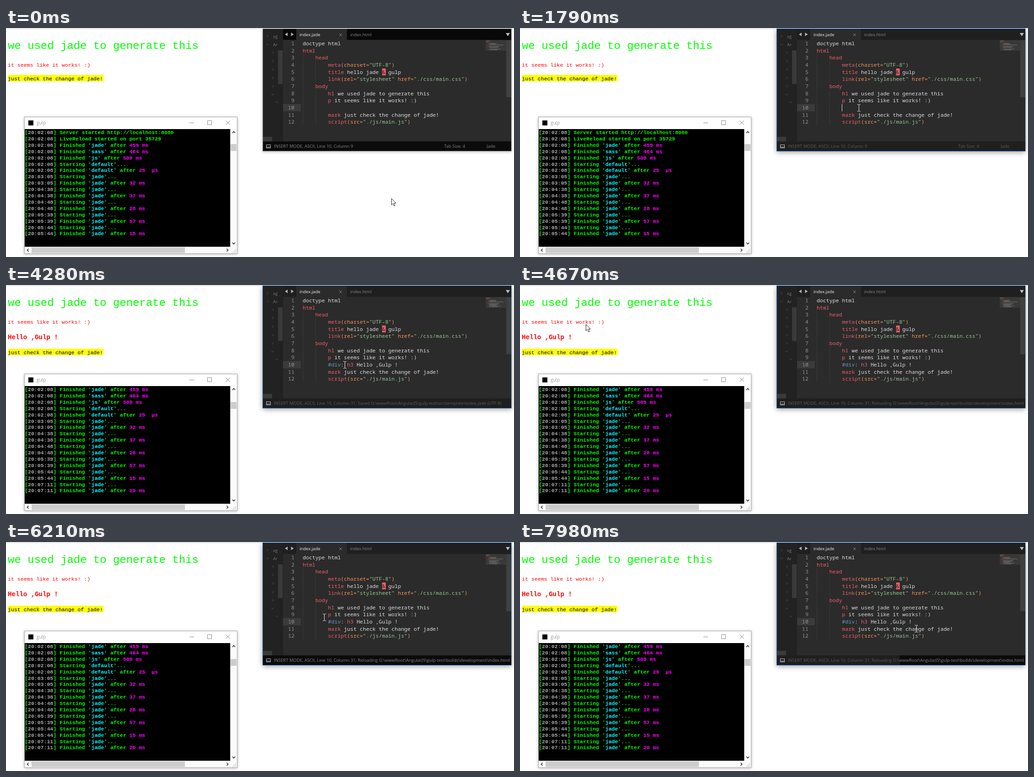
An HTML page that plays this animation: 1113 by 503 pixels, repeating every 8 s.

```html
<!DOCTYPE html>
<html lang="en">
<head>
<meta charset="utf-8">
<title>Live reload</title>
<style>
  html, body { margin: 0; width: 100%; height: 100%; overflow: hidden; background: #fff; }
  svg { position: absolute; left: 0; top: 0; }
  .win { position: absolute; }
  #conWin { left: 40px; top: 195px; width: 467px; height: 301px; box-shadow: 0 1px 6px rgba(0,0,0,.3); }
  #edWin { left: 562px; top: 1px; width: 545px; height: 269px; box-shadow: 0 2px 6px rgba(0,0,0,.3); }
  #edWin.on { box-shadow: 0 3px 11px rgba(0,0,0,.4); }
  text { white-space: pre; }
  .page { font-family: "Liberation Mono", monospace; font-size: 11.58px; }
  .code { font-family: "Noto Sans Mono", monospace; font-size: 11.58px; fill: #dcdcdc; }
  .con { font-family: "Liberation Mono", monospace; font-size: 11.58px; font-weight: bold; fill: #0f0; }
  .ui { font-family: "Open Sans", sans-serif; font-size: 9.5px; }
  .num { fill: #929292; text-anchor: end; }
  .r { fill: #ec5f67; } .o { fill: #f99157; } .g { fill: #99c794; } .b { fill: #6699cc; } .k { fill: #2b2b2b; }
  .t { fill: #a8a8a8; } .c { fill: #0ff; } .m { fill: #f0f; }
  .line { fill: none; stroke-width: 1; }
  .bold .line { stroke-width: 1.7; }
</style>
</head>
<body>
<div class="win" id="conWin"></div>
<div class="win" id="edWin"></div>
<svg id="stage" width="1113" height="503" viewBox="0 0 1113 503"></svg>
<script>
const LOOP = 8000, PITCH = 6.95, ROW = 15.64, CON_ROW = 13.9;
const esc = s => s.replace(/&/g, '&amp;').replace(/</g, '&lt;');
const rect = (x, y, w, h, fill, more = '') =>
  `<rect x="${x}" y="${y}" width="${w}" height="${h}" fill="${fill}" ${more}/>`;
const path = (d, color, more = '') => `<path class="line" d="${d}" stroke="${color}" ${more}/>`;
const text = (x, y, cls, str, more = '') => `<text x="${x}" y="${y}" class="${cls}" ${more}>${esc(str)}</text>`;
// Segments are split by "|"; the first letter of each is its colour class.
const rich = (x, y, cls, str, more = '') => `<text x="${x}" y="${y}" class="${cls}" ${more}>` +
  str.split('|').map(s => `<tspan class="${s[0]}">${esc(s.slice(1))}</tspan>`).join('') + '</text>';
const chevron = (x, y, dir, color, s = 2.5) => {
  const d = { r: [-s / 2, -s, s / 2, 0, -s / 2, s], l: [s / 2, -s, -s / 2, 0, s / 2, s],
              d: [-s, -s / 2, 0, s / 2, s, -s / 2], u: [-s, s / 2, 0, -s / 2, s, s / 2] }[dir];
  return path(`M${x + d[0]} ${y + d[1]}L${x + d[2]} ${y + d[3]}L${x + d[4]} ${y + d[5]}`, color);
};
const cross = (x, y, s, color) => path(`M${x - s} ${y - s}l${2 * s} ${2 * s}m0 ${-2 * s}l${-2 * s} ${2 * s}`, color);

function page() {
  return rect(0, 1, 1113, 1, '#c8c8c8') +
    text(4, 46, 'page', 'we used jade to generate this', 'fill="#0f0" style="font-size:24.03px"') +
    text(4, 84.5, 'page', 'it seems like it works! :)', 'fill="#f00"') +
    text(4, 118.5, 'page', 'Hello ,Gulp !', 'id="hello" fill="#f00" style="font-size:14.08px;font-weight:bold"') +
    '<g id="mark">' + rect(4.5, 103, 209, 14, '#ff0') +
    text(4, 114.5, 'page', 'just check the change of jade!') + '</g>';
}

const log = [['02:08', 'Server started http://localhost:8080'], ['02:08', 'LiveReload started on port 35729'],
  ['02:08', 'jade', '459 ms'], ['02:08', 'sass', '464 ms'], ['02:08', 'js', '509 ms'],
  ['02:08', 'default', ''], ['02:08', 'default', '25  μs']];
[['03:05', 32], ['04:38', 37], ['04:48', 28], ['05:39', 57], ['05:44', 15], ['07:11', 20]]
  .forEach(([at, ms]) => log.push([at, 'jade', ''], [at, 'jade', ms + ' ms']));

function logLine([at, what, took], i) {
  const body = took === undefined ? what
    : took ? `Finished '|c${what}|n' after |m${took}` : `Starting '|c${what}|n'...`;
  return rich(41, 0, 'con', `n[|t20:${at}|n] ${body}`, `id="log${i}"`);
}

function consoleWindow() {
  let grip = '';
  for (let i = 0; i < 3; i++)
    for (let j = 0; j <= i; j++) grip += rect(502 - 3 * j, 486 + 3 * i, 1.5, 1.5, '#b0b0b0');
  return rect(40.5, 195.5, 466, 300, '#fff', 'stroke="#a8a8a8"') +
    rect(49, 203, 11, 11, '#000') + text(67, 212, 'ui', 'gulp', 'fill="#999" style="font-size:10px"') +
    path('M402 208.5h10M441.5 203.5h9v9h-9z', '#888') + cross(486, 208, 4.5, '#888') +
    rect(41, 222, 450.5, 258.5, '#000') + rect(491.5, 222, 14.5, 259, '#fafafa') +
    rect(41, 481, 465, 14, '#fafafa') + rect(56, 482, 336, 12, '#cdcdcd') +
    rect(492, 255, 13, 15, '#cdcdcd', 'id="thumb"') +
    '<g class="bold">' + chevron(499, 229, 'u', '#333', 3) + chevron(499, 473, 'd', '#333', 3) +
    chevron(48, 488, 'l', '#333', 3) + chevron(485, 488, 'r', '#333', 3) + '</g>' + grip +
    log.map(logLine).join('');
}

const code = [[0, 'ndoctype html'], [0, 'rhtml'], [4, 'rhead'],
  [8, 'rmeta|o(charset=|g"UTF-8"|o)'], [8, 'rtitle|n hello jade |k&|n gulp'],
  [8, 'rlink|o(rel=|g"stylesheet"|o href=|g"./css/main.css"|o)'], [4, 'rbody'],
  [8, 'rh1|n we used jade to generate this'], [8, 'rp|n it seems like it works! :)'],
  [8, 'b#div|n: |rh3|n Hello ,Gulp !'], [8, 'rmark|n just check the change of jade!'],
  [8, 'rscript|o(src=|g"./js/main.js"|o)']];
const col = n => 650 + n * PITCH;
const base = i => 38.2 + i * ROW;

function miniLine([indent, str], i) {
  let x = 1052 + indent * .75;
  const bars = str.split('|').map(seg => {
    const w = (seg.length - 1) * .72;
    x += w;
    return `<rect class="${seg[0]}" x="${x - w}" y="${28 + i * 1.75}" width="${w}" height="1" opacity=".5"/>`;
  }).join('');
  return `<g fill="#aaa" ${i === 9 ? 'id="miniNew"' : ''}>${bars}</g>`;
}

function sidebar() {
  const c = '#555';
  return rect(563, 2, 44, 248, '#222') + chevron(573, 18, 'r', c) + chevron(573, 36, 'd', c) +
    text(585, 22, 'ui', 'xg', 'fill="#777"') + text(585, 40, 'ui', 'Ar', 'fill="#777"') +
    [54, 72, 91, 110, 128].map(y => chevron(585, y, 'r', c)).join('') +
    chevron(584, 146, 'd', c) + chevron(593, 163, 'd', c) +
    rect(596, 49, 10, 74, '#3a3a3a') + rect(563, 239, 20, 10, '#3a3a3a');
}

const statusBar = (id, bg, ink) => `<g id="${id}">` + rect(563, 249, 544, 21, bg) +
  path('M570.5 256.5h9v7h-9zM570 261.5h10', '#c8c8c8') +
  `<g clip-path="url(#statusClip)">` + text(587, 263, 'ui msg', '', `fill="${ink}"`) + '</g>' +
  `<g class="labels">` + text(960, 263, 'ui', 'Tab Size: 4', `fill="${ink}"`) +
  text(1053, 263, 'ui', 'Jade', `fill="${ink}"`) + '</g></g>';

function editor() {
  const guides = [[0, 2, 12], [4, 3, 6], [4, 7, 12]].map(([c, a, b]) =>
    path(`M${Math.round(col(c)) + .5} ${26 + a * ROW}V${26 + b * ROW}`, '#4a4a4a', 'stroke-dasharray="1 1"')).join('');
  const lines = code.map(([indent, s], i) =>
    text(632, base(i), 'code num', String(i + 1)) +
    rich(col(indent), base(i), 'code', s, i === 9 ? 'id="added"' : '')).join('');
  return rect(562.5, 1.5, 544.5, 269, '#1c1c1c', 'id="frame"') + sidebar() +
    rect(607, 2, 500, 25, '#080808', 'id="tabs"') + rect(636, 2, 111, 25, '#2b2b2b') +
    rect(607, 26, 500, 223, '#2b2b2b') +
    '<path d="M617 10v8l-6-4zM624.5 10v8l6-4z" fill="#b0b0b0"/><path d="M1095 11h9l-4.5 7z" fill="#c0c0c0"/>' +
    text(643, 18, 'ui', 'index.jade', 'fill="#f0f0f0"') + text(754, 18, 'ui', 'index.html', 'fill="#858585"') +
    `<g id="clean">${cross(733, 15, 3, '#888')}</g>` +
    '<circle id="dirty" class="line" cx="733" cy="15" r="3" stroke="#e8c35c"/>' +
    rect(607, 167, 39, 16, '#3b3b3b') + guides + rect(824, 89, 8, 15, '#ec5f67') + lines +
    rect(0, 167, 1, 16, '#e8e8e8', 'id="caret"') +
    rect(1051, 27, 45, 23, '#383838') + code.map(miniLine).join('') + rect(1096, 27, 11, 125, '#404040') +
    statusBar('lit', '#0b0b0b', '#858585') +
    `<g clip-path="url(#dimClip)">${statusBar('dim', '#1f1f1f', '#5c5c5c')}</g>`;
}

const pointer = '<g id="cursor">' +
  '<path id="arrow" d="M0 0V14L3.3 11L5.7 16.5L8 15.5L5.6 10.2H10Z" fill="#fff" stroke="#222"/>' +
  '<g id="beam"><path class="line" d="M-3.5 -7.5H-1L0 -6.5L1 -7.5H3.5M0 -6.5V6.5M-3.5 7.5H-1L0 6.5L1 7.5H3.5" stroke="#eee"/></g>' +
  '<g id="busy"><circle class="line" cx="12" cy="0" r="4.5" stroke="#2d86c9" style="stroke-width:3.2"/>' +
  '<path id="spin" class="line" d="M12 -4.5A4.5 4.5 0 0 1 16.5 0" stroke="#7cc4ee" style="stroke-width:2"/></g></g>';

const $ = id => document.getElementById(id);
$('stage').innerHTML = '<defs><clipPath id="statusClip"><rect x="563" y="249" width="541" height="21"/></clipPath>' +
  '<clipPath id="dimClip"><rect id="dimBox" x="563" y="249" width="544" height="21"/></clipPath></defs>' +
  page() + consoleWindow() + editor() + pointer;

const mode = 'INSERT MODE, ASCII, Line 10, Column ';
const root = '31; %G:\\wwwRoot\\AngularJS\\gulp-test\\';
const messages = [[0, mode + '9'], [2340, mode + '31'],
  [3770, mode + root.replace('%', 'Saved ') + 'src\\template\\index.jade (UTF-8)'],
  [4400, mode + root.replace('%', 'Reloading ') + 'builds\\development\\index.html']];
const dimWidth = [[0, 0], [1300, 544], [4700, 0], [7650, 269]];
const logShift = [[0, 0], [3890, 1], [3990, 2]];
// time, x, y of the hot spot
const route = [[0, 844, 374], [370, 844, 374], [600, 857, 330], [850, 845, 230], [1060, 822, 176],
  [1150, 784, 171], [1240, 742, 175], [4290, 742, 175], [4500, 400, 120], [4720, 70, 76],
  [5000, 30, 88], [5120, 30, 88], [5220, 60, 100], [5400, 500, 160], [5600, 985, 218],
  [5880, 873, 181], [6180, 873, 181], [6210, 700, 165], [6360, 300, 120], [6510, 60, 95],
  [6700, 5, 80], [6990, 52, 110], [7200, 200, 250], [7400, 450, 380], [7600, 750, 330],
  [7800, 859, 236], [7980, 868, 190], [8000, 868, 190]];
// caret opacity over time
const blink = [[0, 0], [1270, 0], [1300, 1], [1790, 1], [1970, 0], [2339, 0], [2340, 1], [2710, 1], [2890, 0],
  [3380, 0], [3530, 1], [3940, 1], [4090, 0], [5700, 0], [5710, 1], [5910, 1], [6060, 0],
  [7770, 0], [7780, 1], [7830, 1], [7980, 0], [8000, 0]];

const step = (table, t) => table.filter(k => k[0] <= t).pop()[1];
function tween(table, t) {
  const i = Math.max(1, table.findIndex(k => k[0] > t));
  const a = table[i - 1], b = table[i], f = (t - a[0]) / (b[0] - a[0]);
  return a.slice(1).map((v, n) => v + (b[n + 1] - v) * f);
}
const show = (id, on) => $(id).setAttribute('visibility', on ? 'visible' : 'hidden');

function draw(t) {
  const focus = t >= 1300, pasted = t >= 2340, saved = t >= 3770, reloaded = t >= 4280;
  show('hello', reloaded);
  $('mark').setAttribute('transform', `translate(0 ${reloaded ? 37 : 0})`);

  const shift = step(logShift, t);
  log.forEach((_, i) => {
    const row = i - shift;
    show('log' + i, row >= 0 && row < 17);
    $('log' + i).setAttribute('y', 233 + row * CON_ROW);
  });
  $('thumb').setAttribute('y', 255 + shift);

  $('edWin').className = focus ? 'win on' : 'win';
  $('frame').setAttribute('stroke', focus ? '#1e63b4' : '#9a9a9a');
  $('tabs').setAttribute('fill', focus ? '#1f1f1f' : '#080808');
  show('added', pasted);
  show('miniNew', pasted);
  show('dirty', pasted && !saved);
  show('clean', !pasted || saved);
  $('caret').setAttribute('x', pasted ? 858 : 705);
  $('caret').setAttribute('opacity', tween(blink, t)[0]);

  const msg = step(messages, t);
  document.querySelectorAll('.msg').forEach(el => { if (el.textContent !== msg) el.textContent = msg; });
  document.querySelectorAll('.labels').forEach(el => el.setAttribute('visibility', saved ? 'hidden' : 'visible'));
  $('dimBox').setAttribute('width', step(dimWidth, t));

  const [x, y] = tween(route, t).map(Math.round);
  const inCode = x > 606 && x < 1096 && y > 26 && y < 249;
  $('cursor').setAttribute('transform', `translate(${x + .5} ${y + .5})`);
  show('beam', inCode);
  show('arrow', !inCode);
  show('busy', !inCode && t > 4700 && t < 5400);
  $('spin').setAttribute('transform', `rotate(${t * .36 % 360} 12 0)`);
}

const start = performance.now();
function tick(now) {
  draw(Math.max(0, now - start) % LOOP);
  requestAnimationFrame(tick);
}
draw(0);
requestAnimationFrame(tick);
</script>
</body>
</html>
```
